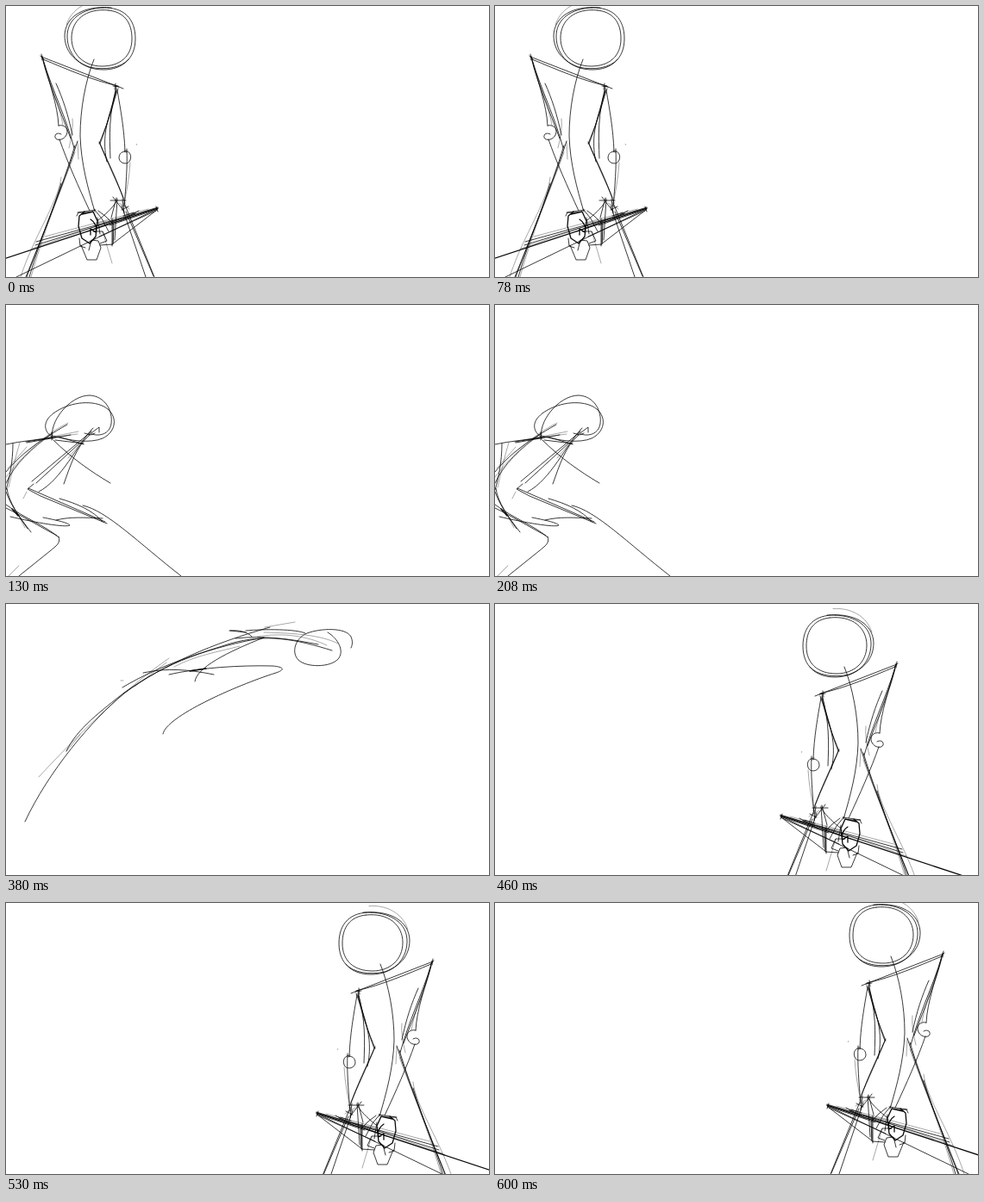
An HTML page that plays this animation: 560 px wide and 315 px high, repeating every 660 ms.

```html
<!DOCTYPE html>
<html lang="en">
<head>
<meta charset="utf-8">
<title>Sword sketch</title>
<style>
html, body { margin: 0; width: 100%; height: 100%; overflow: hidden; background: #fff; }
svg { display: block; width: 100vw; height: 100vh; }
path { fill: none; stroke: #080808; stroke-linecap: round; stroke-linejoin: round; }
.thin { stroke-width: .5; stroke-opacity: .7; }
.pen { stroke-width: .8; }
.bold { stroke-width: 1.3; }
</style>
</head>
<body>
<svg id="stage" viewBox="0 0 560 315" preserveAspectRatio="none"></svg>
<script>
const stage = document.getElementById('stage');

// Standing figure, facing right
const stand = {
  thin: [
    // head
    'M115 -5.5C96 -7 76 2 70 22',
    // torso
    'M77 131C78 142 76 152 73 165', 'M83 158L84 178', 'M44 66C53 96 62 116 66 138',
    // right forearm
    'M144 182C143 199 140 216 136 234',
    // legs
    'M64 199C62 225 31 270 17 315', 'M80 170C68 204 46 254 29 315',
    // hip and blade
    'M112 262L123 299', 'M131 229L143 236', 'M30 282L150 240', 'M45 268L165 236',
    'M108 252L152 243', 'M151.3 160.5L151.6 161.5'
  ],
  pen: [
    // head
    'M112 2C137 1 150 15 150 38C150 61 135 74 113 74C88 74 72 58 71 37C70 14 90 3 112 2',
    'M119 5C92 2 76 17 76 37C76 57 91 70 111 70C133 70 146 58 146 38C146 19 137 7 119 5',
    'M122 2C90 -1 69 12 68 34C68 53 80 65 97 71C114 75 134 72 142 62',
    // spine
    'M102 62C92 87 86 120 86 151C87 183 95 212 103 239',
    // shoulders
    'M41 59L136 96', 'M43 62C72 74 99 86 130 93', 'M41 56L42 63M40 58L44 62M124 93L131 94M127 90L126 97',
    // torso and left arm
    'M42 58C49 86 60 115 61 139', 'M42 60C55 101 69 128 79 165', 'M43 64C50 92 62 119 75 154',
    'M58 90C66 108 72 126 77 150',
    'M61 139C69 137 73 144 70 150C67 156 59 157 57 153C56 148 61 147 64 149',
    'M62 155C71 181 84 210 97 238',
    // right arm
    'M128 93C123 119 116 142 109 160', 'M130 96C123 116 117 132 115 150C114 163 115 172 117 181',
    'M128 96C119 126 120 151 121 177', 'M128 98C124 120 115 143 108 160', 'M129 98C133 121 137 143 138 169',
    'M137 168C143 168 146 173 144 179C142 185 132 184 131 177C131 171 135 168 140 170',
    'M140 166C141 186 139 210 137 233',
    'M109 160C117 179 129 202 138 229', 'M108 158C119 185 129 205 136 223',
    // left leg
    'M83 157C69 202 43 263 24 315', 'M80 162C66 210 40 268 27 315', 'M64 206C54 240 37 280 23 315',
    // right leg
    'M137 229L172 315', 'M134 232L162 315', 'M139 239L171 314',
    // hip
    'M121 226L139 226', 'M124 222L137 239', 'M128 223L122 246', 'M129 224L126 272',
    'M135 224L137 241M134 237L142 233M136 244L148 240',
    'M129 226C122 237 114 243 107 249',
    // blade
    'M176 235L35 274', 'M175 236L12 315', 'M176 234L34 278', 'M174 238L108 268', 'M176 236L120 255',
    'M174 233L176 239', 'M150 241L95 262', 'M154 238L132 250', 'M175 237L123 277',
    // guard
    'M107 238L116 245L125 254L124 277L109 278', 'M123 247L123 279M124 250L124 275', 'M102 236L111 247L119 262',
    'M101 262L112 262L117 273L109 276',
    // lower hand
    'M87 278L94 295L105 295L110 281L107 273L99 272L96 284', 'M85 270L86 279L92 281',
    'M82 244L84 240L96 240M83 240L104 237M106 246L109 265'
  ],
  bold: [
    'M-45 308L176 235',
    'M88 242L101 239L106 250L104 268L97 276L88 270L84 256L85 244L91 239',
    'M98 248C103 251 106 257 104 263L98 259L98 266'
  ]
};

// Crouching lunge
const lunge = {
  thin: [
    'M84 147L33 157', 'M83 150L45 155', 'M16 160C10 180 7 195 3 212', 'M15 303L3 315',
    'M0 200C18 177 40 153 72 137', 'M20 225L24 217', 'M99 146L72 178', 'M12 240L22 259', 'M2 190L24 165'
  ],
  pen: [
    // head
    'M54 156C49 136 74 105 97 105C115 106 124 123 122 138C120 150 109 153 99 150',
    'M54 154C41 145 43 132 61 122C81 111 106 111 118 121C130 131 127 148 112 155C98 161 74 158 54 152',
    'M96 151L108 142L108 148M103 149L98 151L91 149',
    // back
    'M0 162C18 158 36 157 54 154', 'M23 159L61 153L90 162', 'M0 194C17 174 34 160 71 139',
    'M0 207C10 185 29 167 54 149', 'M57 157L90 161', 'M24 160L75 151', 'M53 148L53 157',
    // arms
    'M55 157C76 178 99 194 121 207', 'M101 143C83 161 65 203 38 217', 'M99 147L30 205',
    'M97 151C81 165 75 186 67 208', 'M86 160L35 207',
    // side
    'M8 161C8 183 4 201 0 215', 'M1 213C3 229 15 246 29 264', 'M0 217C5 231 13 243 25 260',
    'M0 232C23 249 45 256 61 270', 'M0 236C17 244 40 258 59 268',
    // thighs
    'M26 213L115 252', 'M32 208L25 214L40 222L117 254', 'M62 225C83 231 101 239 112 252',
    'M89 233C117 239 153 276 203 315',
    'M58 250C74 246 91 247 112 248', 'M43 247C58 250 72 253 74 256C70 259 34 253 5 246',
    'M61 269C64 277 58 280 51 286L15 315'
  ],
  bold: ['M7 237L14 245']
};

// Leap
const leap = {
  thin: [
    'M38 201C79 157 134 101 189 63', 'M195 73C219 60 244 56 271 49', 'M70 171L86 152',
    'M149 96L186 68', 'M299 33C336 34 365 36 385 46', 'M133 89L136 89', 'M291 38C320 33 349 37 372 48',
    'M300 27L335 21'
  ],
  pen: [
    // back
    'M22 253C49 195 99 135 137 104C185 67 239 50 299 39',
    'M70 171C82 145 112 123 137 103C184 70 239 46 306 27',
    'M135 97C180 70 229 56 260 46C302 34 336 41 378 54',
    'M159 80C187 74 211 76 241 82', 'M266 40C299 36 332 41 362 47',
    'M259 31C269 30 280 32 285 38M260 31L278 33',
    'M278 31C299 29 337 29 347 34',
    // arms
    'M219 90C221 74 256 56 299 39',
    'M189 82C223 74 273 71 309 72C321 73 325 76 313 80C266 95 185 131 182 151',
    // head
    'M373 33C385 40 393 55 385 64C376 74 348 74 339 65C330 56 336 39 349 34C365 28 394 27 400 38C402 43 402 47 400 51'
  ],
  bold: ['M213 78L232 75']
};

function addFigure(strokes) {
  const ns = stage.namespaceURI;
  const group = document.createElementNS(ns, 'g');
  for (const [weight, paths] of Object.entries(strokes)) {
    const path = document.createElementNS(ns, 'path');
    path.setAttribute('class', weight);
    path.setAttribute('d', paths.join(''));
    group.append(path);
  }
  stage.append(group);
  return group;
}

const figures = [stand, lunge, leap].map(addFigure);
const [standing, lunging, leaping] = figures;
const mirror = (x, y) => `matrix(-1 0 0 1 ${x} ${y})`;
const PERIOD = 660;

const poses = [
  { until: 130, figure: standing, place: '' },
  { until: 260, figure: lunging, place: '' },
  { until: 460, figure: leaping, place: '' },
  { until: 530, figure: standing, place: mirror(507, 11) },
  { until: 600, figure: standing, place: mirror(536, 9) },
  { until: 660, figure: standing, place: mirror(561, 0) }
];

function render(time) {
  const t = time % PERIOD;
  const pose = poses.find(p => t < p.until);
  for (const f of figures) f.style.display = f === pose.figure ? '' : 'none';
  pose.figure.setAttribute('transform', pose.place);
}

const start = performance.now();
function tick() {
  render(performance.now() - start);
  requestAnimationFrame(tick);
}
render(0);
requestAnimationFrame(tick);
</script>
</body>
</html>
```
